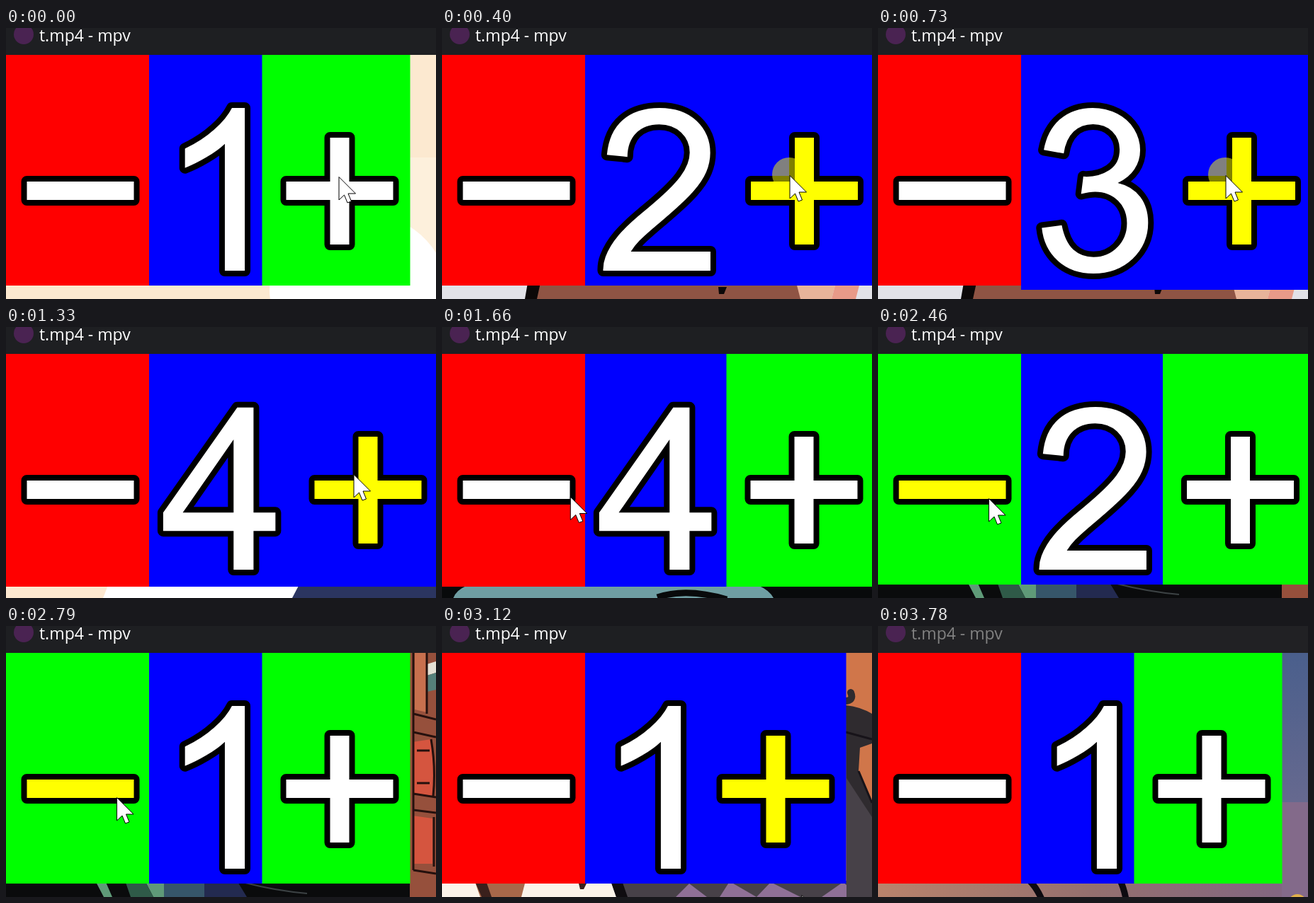
Recreate the animation shown at these times as an HTML page. Size 607 px wide and 383 px high, loop 3850 ms.

```html
<!DOCTYPE html>
<html lang="en">
<head>
<meta charset="utf-8">
<title>Counter overlay</title>
<style>
  html, body { margin: 0; width: 100%; height: 100%; overflow: hidden; background: #1e1f22; }
  svg { display: block; width: 607px; height: 383px; }
  .scene, .digit { visibility: hidden; }
  .on { visibility: visible; }
  .glyph, .digit {
    fill: #fff; stroke: #000; stroke-width: 16; stroke-linejoin: round;
    paint-order: stroke; vector-effect: non-scaling-stroke;
  }
  #title { font: 23px "Open Sans", "Noto Sans", sans-serif; }
</style>
</head>
<body>
<svg viewBox="0 0 607 383">
  <defs>
    <linearGradient id="sky" x2="0" y2="1">
      <stop offset="0" stop-color="#4a5f8c"/>
      <stop offset="1" stop-color="#66698f"/>
    </linearGradient>
    <linearGradient id="dusk">
      <stop offset="0" stop-color="#b9836c"/>
      <stop offset=".5" stop-color="#94706f"/>
      <stop offset="1" stop-color="#806584"/>
    </linearGradient>
  </defs>

  <!-- video behind the overlay -->
  <g class="scene">
    <path fill="#fce9d0" d="M0 38H607V383H0z"/>
    <path fill="#fdf0dc" d="M560 183H607V383H560z"/>
    <ellipse fill="#fff" cx="497" cy="370" rx="125" ry="110"/>
  </g>
  <g class="scene">
    <path fill="#e2e2e8" d="M0 38H607V383H0z"/>
    <path fill="#8f5444" d="M124 360H500L510 383H120z"/>
    <path fill="#0c0808" d="M121 360H139L134 383H117zM390 366H402L398 376H391z"/>
    <path fill="#e8b49a" d="M500 360H556L550 383H506z"/>
    <path fill="#e89a88" d="M556 360H590L584 383H550z"/>
  </g>
  <g class="scene">
    <path fill="#fff" d="M0 38H607V383H0z"/>
    <path fill="#fde8d0" d="M0 360H146L137 383H0z"/>
    <path fill="#2b3560" d="M416 360H607V383H404z"/>
  </g>
  <g class="scene">
    <path fill="#080a0b" d="M0 38H607V383H0z"/>
    <path fill="#6f9ea3" d="M16 383Q20 372 34 366H448Q462 372 468 383z"/>
    <path fill="none" stroke="#080a0b" stroke-width="9" d="M304 382Q345 368 402 385"/>
  </g>
  <g class="scene">
    <path fill="#0a0b0c" d="M0 38H607V383H0z"/>
    <path fill="#5f9a78" d="M126 360H140L150 383H138zM196 360H223V383H208z"/>
    <path fill="#2f5a48" d="M168 360H196L208 383H176z"/>
    <path fill="#36566a" d="M223 360H280V383H223z"/>
    <path fill="#232a50" d="M280 360H326L340 383H280z"/>
    <path fill="none" stroke="#3c4244" stroke-width="2" d="M338 363Q380 374 425 378"/>
    <path fill="#96503c" d="M570 38H607V383H570z"/>
    <path fill="#c8704e" d="M577 38H594V122L577 118z"/>
    <path fill="#e4e0d4" d="M594 54L607 50V66L594 70z"/>
    <path fill="#55807a" d="M594 70L607 66V90L594 93z"/>
    <path fill="#d5553f" d="M574 164L600 160Q606 200 603 240L574 236zM574 268L602 272V336H574z"/>
    <path fill="none" stroke="#25100d" stroke-width="3"
      d="M575 38V345M594 38V124M575 124L607 132M575 150L607 157M600 160Q607 200 603 240M575 237L607 242M575 260L607 264M580 176H598M580 222H598M604 270V340M575 345L607 350"/>
  </g>
  <g class="scene">
    <path fill="#d0764a" d="M0 38H607V383H0z"/>
    <path fill="#fbf3ea" d="M0 360H250V383H0z"/>
    <path fill="#a8684a" d="M46 360H118L112 383H54z"/>
    <path fill="#3a201c" d="M46 360H62L70 383H56zM192 360H206L200 372H195z"/>
    <path fill="#474148" d="M238 360H607V383H246z"/>
    <path fill="#0f0c10" d="M238 360H254L262 383H246z"/>
    <path fill="#8f7097" d="M330 383L349 364L374 383zM392 383L406 361L444 383zM444 383L464 362L506 383zM536 383L566 362L592 383z"/>
    <path fill="#2f2b2f" d="M570 112Q590 114 607 124V166L590 172L588 205L607 250V383H571V364z"/>
    <path fill="#474148" d="M571 215L607 270V383H571z"/>
    <path fill="none" stroke="#2f2b2f" stroke-width="10" stroke-linecap="round" d="M568 106Q582 106 577 94"/>
    <path fill="none" stroke="#171319" stroke-width="3" d="M570 150L607 160M588 205L607 250"/>
  </g>
  <g class="scene">
    <path fill="url(#dusk)" d="M0 360H607V383H0z"/>
    <path fill="url(#sky)" d="M570 38H607V249H570z"/>
    <path fill="#836a8a" d="M570 249H607V383H570z"/>
    <path fill="none" stroke="#0d0a10" stroke-width="9" d="M214 360Q224 370 231 386M342 360Q347 370 350 386"/>
    <circle fill="#e0b04a" cx="592" cy="392" r="13"/>
  </g>

  <!-- title bar -->
  <rect id="bar" width="607" height="38"/>
  <circle cx="25" cy="9" r="14" fill="#4a2352"/>
  <text id="title" x="47" y="19">t.mp4 - mpv</text>

  <!-- overlay -->
  <rect id="countBox" x="200" y="38" fill="#00f"/>
  <rect id="minusBox" y="38" width="202"/>
  <rect id="plusBox" y="38" width="209"/>
  <path id="minus" class="glyph" d="M29.500 217H180.500V243H29.500z"/>
  <g transform="translate(217.8 343) scale(.1563 -.1563)">
    <path class="digit" d="M763 0H583V1147Q518 1085 412 1023Q307 961 223 930V1104Q374 1175 487 1276Q600 1377 647 1472H763z"/>
    <path class="digit" d="M1031 173V0H62Q60 65 83 125Q120 224 201 320Q283 416 437 542Q676 738 760 852Q844 967 844 1069Q844 1176 767 1249Q691 1323 568 1323Q438 1323 360 1245Q282 1167 281 1029L96 1048Q115 1255 239 1363Q363 1472 572 1472Q783 1472 906 1355Q1029 1238 1029 1065Q1029 977 993 892Q957 807 873 713Q790 619 596 455Q434 319 388 270Q342 222 312 173z"/>
    <path class="digit" d="M86 387L266 411Q297 258 371 190Q446 123 553 123Q680 123 767 211Q855 299 855 429Q855 553 774 633Q693 714 568 714Q517 714 441 694L461 852Q479 850 490 850Q605 850 697 910Q789 970 789 1095Q789 1194 722 1259Q655 1324 549 1324Q444 1324 374 1258Q304 1192 284 1060L104 1092Q137 1273 254 1372Q371 1472 545 1472Q665 1472 766 1420Q867 1369 920 1280Q974 1191 974 1091Q974 996 923 918Q872 840 772 794Q902 764 974 669Q1046 575 1046 433Q1046 241 906 107Q766 -26 552 -26Q359 -26 231 89Q104 204 86 387z"/>
    <path class="digit" d="M662 0V351H26V516L695 1466H842V516H1040V351H842V0zM662 516V1177L203 516z"/>
  </g>
  <path id="plus" class="glyph" d="M34 217H96V155H123V217H185V243H123V306H96V243H34z"/>

  <g id="pointer">
    <circle id="flash" cx="-1" cy="-1" r="24" fill="#ff0" fill-opacity=".5"/>
    <path fill="#fff" stroke="#000" d="M0 .5V33L7.500 26L12 37L17.500 35L13 24H23.500z"/>
  </g>
</svg>

<script>
const LOOP = 3850, STEPS = 58;
const $ = id => document.getElementById(id);
const scenes = [...document.querySelectorAll('.scene')];
const digits = [...document.querySelectorAll('.digit')];

// all times below are in steps of LOOP / STEPS
const cuts = [0, 5, 15, 25, 36, 44, 52];
const counts = [[0, 1], [5, 2], [10, 3], [16, 4], [28, 3], [34, 2], [39, 1]];
const path = [
  [0, 470, 210], [2, 491, 208], [20, 491, 208], [26, 156.5, 242],
  [42, 156.5, 242], [45, 470, 235], [47, 508, 380], [48, 508, 420]
];
// right and bottom edge of the number's box
const size = { 1: [361.5, 364], 2: [402, 364], 3: [404, 370], 4: [401.5, 367] };
const BLUR_AT = 53;

const countAt = n => counts.filter(c => c[0] <= Math.max(n, 0)).pop()[1];

function pointerAt(n) {
  const i = path.findIndex(p => p[0] >= n);
  if (n < 0 || i < 0) return [0, 999];
  if (i === 0) return path[0].slice(1);
  const [t0, x0, y0] = path[i - 1], [t1, x1, y1] = path[i];
  const u = (n - t0) / (t1 - t0), e = u * u * (3 - 2 * u);
  return [x0 + (x1 - x0) * e, y0 + (y1 - y0) * e];
}

function hoverAt(n, right, bottom) {
  const [x, y] = pointerAt(n);
  if (y > bottom) return '';
  return x < 202 ? 'minus' : x > right ? 'plus' : '';
}

function set(id, attrs) {
  for (const k in attrs) $(id).setAttribute(k, attrs[k]);
}

const show = (list, k) => list.forEach((el, i) => el.classList.toggle('on', i === k));

function draw(n) {
  const count = countAt(n), [right, bottom] = size[count];
  const hover = hoverAt(n - 1, right, bottom);   // hover reacts one step late
  const [x, y] = pointerAt(n);
  const blurred = n >= BLUR_AT;

  show(scenes, cuts.filter(c => c <= n).length - 1);
  show(digits, count - 1);

  set('bar', { fill: blurred ? '#212124' : '#1e1f22' });
  set('title', { fill: blurred ? '#828282' : '#fff' });
  set('minusBox', {
    height: size[countAt(n - 2)][1] - 38,
    fill: hover === 'minus' ? '#0f0' : '#f00'
  });
  // the middle box runs on under its neighbour, so no seam shows
  set('countBox', { x: 202, width: right - 201, height: bottom - 38 });
  set('plusBox', { x: right, height: bottom - 38, fill: hover === 'plus' ? '#00f' : '#0f0' });
  $('minus').style.fill = hover === 'minus' ? '#ff0' : '#fff';
  $('plus').style.fill = hover === 'plus' ? '#ff0' : '#fff';
  set('plus', { transform: `translate(${right} 0)` });
  set('pointer', { transform: `translate(${x} ${y})` });

  const clicked = counts.some(([c]) => c > 0 && Math.abs(n - c) <= 1);
  set('flash', { visibility: clicked ? 'visible' : 'hidden' });
}

const start = performance.now();
function tick(now) {
  const t = Math.max(now - start, 0) % LOOP;
  draw(Math.floor((t + 8) * STEPS / LOOP) % STEPS);
  requestAnimationFrame(tick);
}
draw(0);
requestAnimationFrame(tick);
</script>
</body>
</html>
```
